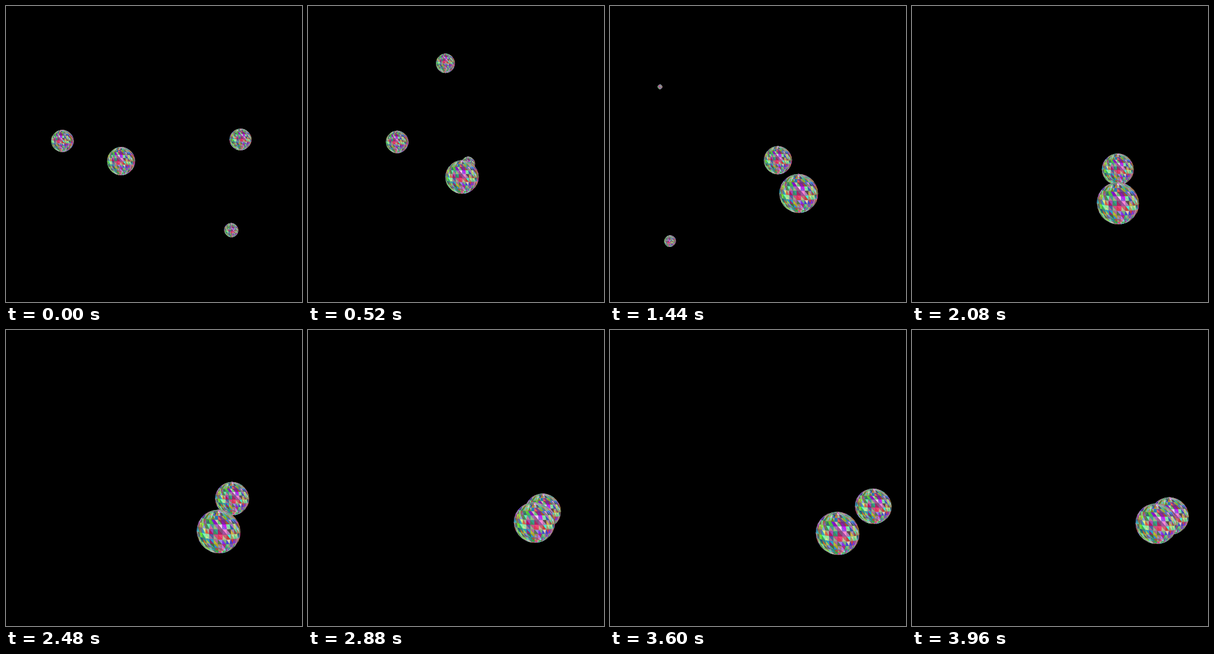
Recreate the animation shown at these times as an HTML page with a canvas. Size 500x500 px, loop 4 s.

```html
<!DOCTYPE html>
<html lang="en">
<head>
<meta charset="utf-8">
<title>Four bodies</title>
<style>
  html, body { margin: 0; width: 100%; height: 100%; overflow: hidden; background: #000; }
  canvas { display: block; width: 500px; height: 500px; }
</style>
</head>
<body>
<canvas id="stage" width="500" height="500"></canvas>
<script>
const ctx = document.getElementById('stage').getContext('2d');
const LOOP = 4000, STEP = 40, MID = 250;
const FOCAL = 603;            // 45 degree field of view
const COLS = 32, ROWS = 14;
const ECC = 0.95;

// Screen position and radius -> camera space, in sphere radii
const toWorld = (x, y, r) => [(x - MID) / r, (y - MID) / r, FOCAL / r];

// Smooth curve through [time, vector] keys
function curve(keys) {
  const slope = (i, k) => {
    const a = keys[Math.max(i - 1, 0)], b = keys[Math.min(i + 1, keys.length - 1)];
    return (b[1][k] - a[1][k]) / (b[0] - a[0]);
  };
  return t => {
    let i = 0;
    while (i < keys.length - 2 && t > keys[i + 1][0]) i++;
    const [t0, p] = keys[i], [t1, q] = keys[i + 1], h = t1 - t0;
    const u = Math.min((t - t0) / h, 1), v = 1 - u;
    return p.map((n, k) =>
      n * v * v * (1 + 2 * u) + q[k] * u * u * (3 - 2 * u) +
      h * u * v * (slope(i, k) * v - slope(i + 1, k) * u));
  };
}

// Separation of the pair: an eccentric orbit that tightens after the first passes
function separation(t) {
  let apo, half;
  if (t < 1.17) { apo = 0.3; half = 0.87; }
  else if (t < 1.676) { apo = 1.423; half = 0.253; }
  else { half = 0.29; apo = 1.966 + 0.58 * Math.round((t - 1.966) / 0.58); }
  const mean = Math.PI * Math.min(Math.abs(t - apo) / half, 1);
  let lo = 0, hi = Math.PI;
  for (let i = 0; i < 24; i++) {
    const e = (lo + hi) / 2;
    if (e + ECC * Math.sin(e) < mean) lo = e; else hi = e;
  }
  return 1 + ECC * Math.cos(lo);
}

// time, then x, y, radius of each partner
const pair = [
  [0,     95.5, 228, 18.2,    194.5, 262, 23.4],
  [1,     225.5, 247.5, 21.4, 286.5, 289, 28.1],
  [1.44,  283.5, 260.5, 23.4, 318.5, 316.5, 32.3],
  [2.08,  347.5, 276, 26.3,   347.5, 333, 34.8],
  [2.546, 387, 286, 27.7,     360, 341.5, 36.3],
  [2.88,  396.5, 306, 29.3,   382, 325, 33.6],
  [3.126, 420, 293, 28.6,     374, 345.5, 36.6],
  [3.24,  425, 295, 28.6,     380.5, 343, 36.2],
  [3.706, 451, 297.5, 29.3,   382, 345, 35.8],
  [3.96,  434.5, 314, 31,     412, 327, 33.5]
].map(([t, ...n]) => [t, toWorld(...n.slice(0, 3)), toWorld(...n.slice(3))]);

const centre = curve(pair.map(([t, a, b]) => [t, a.map((n, k) => (n + b[k]) / 2)]));
const axis = curve(pair.map(([t, a, b]) => [t, a.map((n, k) => (n - b[k]) / separation(t))]));

const path = rows => curve(rows.map(([t, ...n]) => [t, toWorld(...n)]));
const loners = [
  path([
    [0, 396, 225.5, 17.8], [0.56, 220, 89, 15.5], [0.68, 167, 74, 15],
    [1, 58.5, 205.5, 12.3], [1.16, 56, 277, 11.4], [1.44, 101.5, 397, 9.2],
    [1.68, 120, 457, 8.8], [1.95, 140, 520, 8]
  ]),
  path([
    [0, 380.5, 378.5, 11.4], [0.56, 262, 258, 11.3], [1, 174.5, 178, 10.4],
    [1.44, 84.5, 136.5, 3.4], [1.68, 47, 124, 2.8], [2.06, -8, 107, 2.2]
  ])
];

// Sphere mesh with one flat colour per triangle
let seed = 20117;
const rnd = () => (seed = (seed * 16807) % 2147483647) / 2147483647;
const tints = [
  [110, 90, 190], [60, 215, 90], [110, 230, 120], [90, 40, 120],
  [225, 70, 210], [120, 170, 120], [90, 150, 190], [190, 80, 90]
];

function vertex(row, col) {
  const a = col / COLS * 2 * Math.PI, b = row / ROWS * Math.PI;
  return [-Math.cos(a) * Math.sin(b), -Math.cos(b), -Math.sin(a) * Math.sin(b)];
}

const mesh = [];
for (let row = 0; row < ROWS; row++) {
  for (let col = 0; col < COLS / 2 + 2; col++) {
    const tint = tints[(col >> 1) % tints.length];
    const add = (...pts) => {
      const rgb = tint.map(n => Math.round(n * 0.35 + rnd() * 255 * 0.72));
      mesh.push({ pts, fill: `rgb(${rgb})` });
    };
    const i = col - 1;
    const a = vertex(row, i + 1), b = vertex(row, i);
    const c = vertex(row + 1, i), d = vertex(row + 1, i + 1);
    if (row > 0) add(a, b, d);
    if (row < ROWS - 1) add(b, c, d);
  }
}

function collect(pos, out) {
  for (const { pts, fill } of mesh) {
    let depth = 0;
    const s = pts.map(p => {
      const z = pos[2] + p[2], k = FOCAL / z;
      depth += z;
      return [MID + (pos[0] + p[0]) * k, MID + (pos[1] + p[1]) * k];
    });
    const [a, b, c] = s;
    const area = (b[0] - a[0]) * (c[1] - a[1]) - (b[1] - a[1]) * (c[0] - a[0]);
    if (area < 0) out.push({ s, fill, depth });
  }
}

function draw(ms) {
  const t = Math.floor((ms % LOOP) / STEP) * STEP / 1000;
  const mid = centre(t), dir = axis(t), half = separation(t) / 2;
  const faces = [];
  for (const side of [1, -1]) collect(mid.map((n, k) => n + side * half * dir[k]), faces);
  if (t < 2.06) loners.forEach(at => collect(at(t), faces));
  faces.sort((p, q) => q.depth - p.depth);

  ctx.fillStyle = '#000';
  ctx.fillRect(0, 0, 500, 500);
  ctx.lineWidth = 0.4;
  ctx.lineJoin = 'round';
  for (const { s, fill } of faces) {
    ctx.beginPath();
    s.forEach(p => ctx.lineTo(p[0], p[1]));
    ctx.closePath();
    ctx.fillStyle = ctx.strokeStyle = fill;
    ctx.fill();
    ctx.stroke();
  }
}

const start = performance.now();
function tick() {
  draw(performance.now() - start);
  requestAnimationFrame(tick);
}
tick();
</script>
</body>
</html>
```
